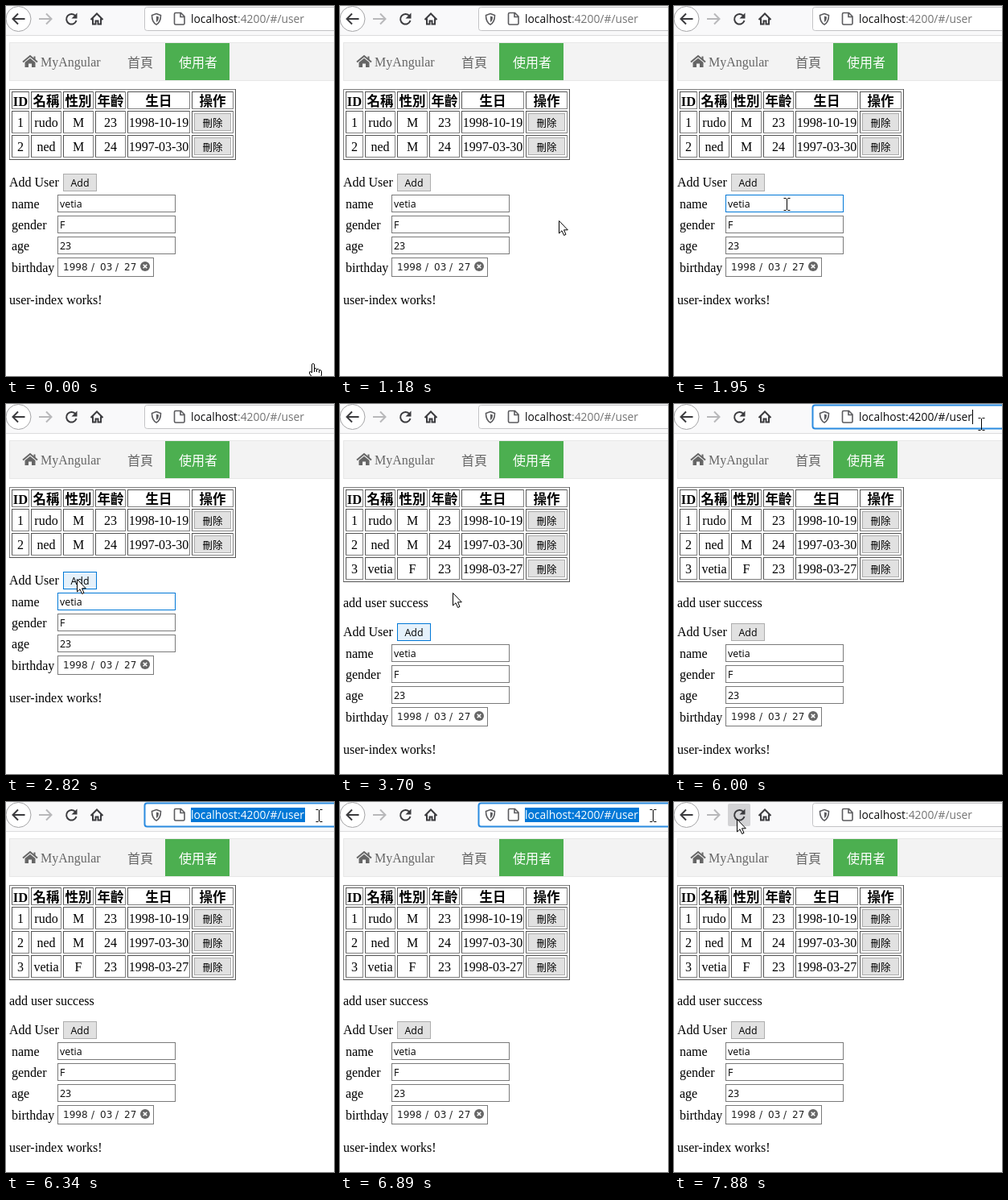
An HTML page with a canvas for the animation above (8 s loop, 408 by 459 pixels).

```html
<!DOCTYPE html>
<html lang="zh-Hant">
<head>
<meta charset="utf-8">
<title>User list</title>
<style>
  html, body { margin: 0; width: 100%; height: 100%; overflow: hidden; background: #fff; }
  canvas { display: block; }
</style>
</head>
<body>
<canvas id="stage" width="408" height="459"></canvas>
<script>
const ctx = document.getElementById('stage').getContext('2d');
const LOOP = 8000;
const CJK = '"Noto Sans CJK TC", "Noto Sans CJK JP", "Noto Sans CJK"';
const SERIF = `16px "Liberation Serif", ${CJK}, serif`;
const BOLD = `bold 16.5px "Liberation Serif", ${CJK}, serif`;
const UI = `12.4px "Open Sans", ${CJK}, sans-serif`;
const URL_FONT = '13.85px "Open Sans", sans-serif';
const BLUE = '#0078d7';

// Pointer moves: first step, last step, number of steps, destination.
const START = [382, 443];
const MOVES = [
  [100, 200, 2, 326, 317],
  [850, 1180, 4, 272, 266],
  [1400, 1740, 4, 140, 246],
  [2380, 2820, 5, 88, 217],
  [3700, 3800, 2, 191, 250],
  [4780, 5020, 3, 252, 217],
  [5120, 5120, 1, 258, 209],
  [5340, 5780, 5, 382, 25],
  [6110, 6340, 3, 389, 17],
  [7320, 7880, 6, 78, 21]
];
const URL_BAR = [172, 1, 240, 30];
const COLUMNS = [[7, 22], [31, 38], [71, 38], [111, 38], [151, 78], [231, 52]];
const HEADS = ['ID', '名稱', '性別', '年齡', '生日', '操作'];
const USERS = [
  ['1', 'rudo', 'M', '23', '1998-10-19'],
  ['2', 'ned', 'M', '24', '1997-03-30'],
  ['3', 'vetia', 'F', '23', '1998-03-27']
];

function pointerAt(t) {
  let [x, y] = START;
  for (const [from, to, steps, toX, toY] of MOVES) {
    if (t < from) break;
    const gap = (to - from) / Math.max(1, steps - 1) || 1;
    const part = Math.min(steps, Math.floor((t - from + 2) / gap) + 1) / steps;
    x += (toX - x) * part;
    y += (toY - y) * part;
  }
  return [Math.round(x), Math.round(y)];
}

const inside = ([px, py], [x, y, w, h]) => px >= x && px < x + w && py >= y && py < y + h;

function text(str, x, y, font = SERIF, color = '#000', align = 'left') {
  ctx.font = font;
  ctx.fillStyle = color;
  ctx.textAlign = align;
  ctx.fillText(str, x, y);
}

function fill(x, y, w, h, color) {
  ctx.fillStyle = color;
  ctx.fillRect(x, y, w, h);
}

function box(x, y, w, h, border, color = '#fff') {
  fill(x, y, w, h, border);
  fill(x + 1, y + 1, w - 2, h - 2, color);
}

function bevel(x, y, w, h, topLeft, bottomRight) {
  fill(x, y, w, h, bottomRight);
  fill(x, y, w - 1, h - 1, topLeft);
  fill(x + 1, y + 1, w - 2, h - 2, '#fff');
}

function shape(d, stroke, width = 1, color) {
  const path = new Path2D(d);
  if (color) { ctx.fillStyle = color; ctx.fill(path); }
  if (stroke) { ctx.strokeStyle = stroke; ctx.lineWidth = width; ctx.stroke(path); }
}

function button(label, [x, y, w, h], baseline, state) {
  const [border, face] = { idle: ['#adadad', '#e1e1e1'], hover: [BLUE, '#e5f1fb'], down: ['#005499', '#cce4f7'] }[state];
  box(x, y, w, h, border, face);
  text(label, x + w / 2, baseline, UI, '#000', 'center');
}

function toolbar(t, mouse) {
  const focused = t >= 6000 && t < 7000;
  const selected = t >= 6110 && t < 7000;
  fill(0, 0, 408, 37, '#f9f9fa');
  fill(0, 36, 408, 1, '#dcdcdd');

  if (inside(mouse, [67, 2, 28, 28])) {
    ctx.beginPath();
    ctx.roundRect(67, 2, 28, 28, 2);
    ctx.fillStyle = '#d3d3d5';
    ctx.fill();
  }
  shape('M31 16A15.5 15.5 0 1 1 0 16A15.5 15.5 0 1 1 31 16Z', '#a5a5a7', 1, '#fff');
  shape('M23.5 16H9M15 9.5L8.5 16L15 22.5', '#3b3b3e', 2);
  shape('M41 16H56M50 9.5L56.5 16L50 22.5', '#b8b8ba', 2);
  shape('M86.5 12.5A6.3 6.3 0 1 0 87.5 18', '#3b3b3e', 2);
  shape('M88.5 8.5V15.5H81.5Z', null, 0, '#3b3b3e');
  shape('M105.5 17L113 9.5L120.5 17M108 15.5V22.5H111.5V18.5H114.5V22.5H118V15.5', '#3b3b3e', 2);

  ctx.beginPath();
  ctx.roundRect(172.5, 1.5, 260, 29, 3);
  ctx.fillStyle = '#fff';
  ctx.fill();
  ctx.lineWidth = focused ? 2 : 1;
  ctx.strokeStyle = focused ? '#2a8be0' : inside(mouse, URL_BAR) ? '#969698' : '#c3c3c5';
  ctx.stroke();
  shape('M187 9.5L192.5 11.5C192.5 17 191 21 187 23C183 21 181.5 17 181.5 11.5Z', '#5b5b5e', 1.6);
  shape('M187 12.5L190 13.5C190 17 189 19 187 20Z', null, 0, '#5b5b5e');
  shape('M211 8.5H217.5L222 13V21.5Q222 23 220.5 23H211Q209.5 23 209.5 21.5V10Q209.5 8.5 211 8.5ZM217 9V13.5H222', '#5b5b5e', 1.6);

  if (selected) fill(230, 7, 142, 18, BLUE);
  const host = 'localhost';
  const hostColor = selected ? '#fff' : '#0c0c0d';
  text(host, 230, 21, URL_FONT, hostColor);
  text(':4200/#/user', 230 + ctx.measureText(host).width, 21, URL_FONT, focused ? hostColor : '#737373');
  if (focused && !selected) fill(371, 7, 1, 18, '#000');
}

function navigation() {
  box(4, 45, 410, 48, '#e7e7e7', '#f3f3f3');
  fill(198, 46, 80, 46, '#4caf50');
  shape('M21 69.5L30 62L39 69.5', '#666', 2);
  shape('M30 64.8L36.5 70V76H32V71.5H28V76H23.5V70ZM34.5 62.5H36.5V67H34.5Z', null, 0, '#666');
  text('MyAngular', 43, 75, SERIF, '#666');
  text('首頁', 151, 76, SERIF, '#666');
  text('使用者', 215, 76, SERIF, '#fff');
}

function userTable(count, mouse) {
  const light = '#808080', dark = '#555';
  bevel(4, 103, 282, 28 + count * 30, light, dark);
  COLUMNS.forEach(([x, w], col) => {
    const middle = x + w / 2;
    bevel(x, 106, w, 22, dark, light);
    text(HEADS[col], middle, 123.5, BOLD, '#000', 'center');
    for (let row = 0; row < count; row++) {
      const y = 130 + row * 30;
      bevel(x, y, w, 28, dark, light);
      if (col < 5) {
        text(USERS[row][col], middle, y + 20, SERIF, '#000', 'center');
      } else {
        const area = [234, y + 3, 46, 22];
        button('刪除', area, y + 19.5, inside(mouse, area) ? 'hover' : 'idle');
      }
    }
  });
}

function form(t, top, mouse) {
  const pressed = t >= 3050 && t < 3150;
  const hot = t >= 2820 && t < 4020;
  text('Add User', 4, top + 16);
  button('Add', [71, top, 42, 22], top + 15.5, pressed ? 'down' : hot ? 'hover' : 'idle');

  [['name', 'vetia'], ['gender', 'F'], ['age', '23']].forEach(([label, value], i) => {
    const y = top + 26 + i * 26;
    const focused = i === 0 && t >= 1950 && t < 3050;
    const hovered = inside(mouse, [64, y, 147, 22]);
    text(label, 7, y + 16.5);
    box(64, y, 147, 22, focused ? BLUE : hovered ? '#171717' : '#7a7a7a');
    text(value, 67, y + 15.5, UI);
  });

  const y = top + 104;
  text('birthday', 7, y + 18);
  box(64, y, 120, 24, '#7a7a7a');
  [['1998', 71], ['/', 106], ['03', 117], ['/', 136], ['27', 147]].forEach(([part, x]) =>
    text(part, x, y + 16, '12px "DejaVu Sans", sans-serif', '#222'));
  shape(`M179 ${y + 11}a6 6 0 1 1 -12 0a6 6 0 1 1 12 0Z`, null, 0, '#666');
  shape(`M170.7 ${y + 8.7}l4.6 4.6m0 -4.6l-4.6 4.6`, '#fff', 1.6);
  text('user-index works!', 4, top + 162);
}

function pointer(t, mouse, fields) {
  ctx.save();
  ctx.translate(...mouse);
  ctx.lineJoin = 'round';
  if (t < 650) {
    shape('M-1.5 12V1.5Q0 -.5 1.5 1.5V7Q3.5 5.5 4.5 7.5Q6.5 6.5 7.5 8.5Q10.5 8 10.5 11V15L8.5 18V21.5H-.5V18.5L-4.5 13Q-5 10 -3 10.5Z', '#000', 1, '#fff');
    shape('M1.5 7V11M4.5 8V11M7.5 9V12', '#000');
  } else if (fields.some(area => inside(mouse, area))) {
    shape('M-3.5 -7.5H-.5M1.5 -7.5H4.5M.5 -7V7M-3.5 7.5H-.5M1.5 7.5H4.5', '#000');
  } else {
    shape('M.5 .5V16L4 12.8L6.6 18.5L9 17.4L6.5 11.8H11.3Z', '#000', 1, '#fff');
  }
  ctx.restore();
}

function draw(t) {
  const mouse = pointerAt(t);
  const added = t >= 3150;
  const formTop = added ? 272 : 208;
  const fields = [URL_BAR, ...[26, 52, 78].map(dy => [64, formTop + dy, 147, 22])];
  fill(0, 0, 408, 459, '#fff');
  toolbar(t, mouse);
  navigation();
  userTable(added ? 3 : 2, mouse);
  if (added) text('add user success', 4, 252);
  form(t, formTop, mouse);
  pointer(t, mouse, fields);
}

function tick() {
  draw(performance.now() % LOOP);
  requestAnimationFrame(tick);
}
tick();
</script>
</body>
</html>
```
